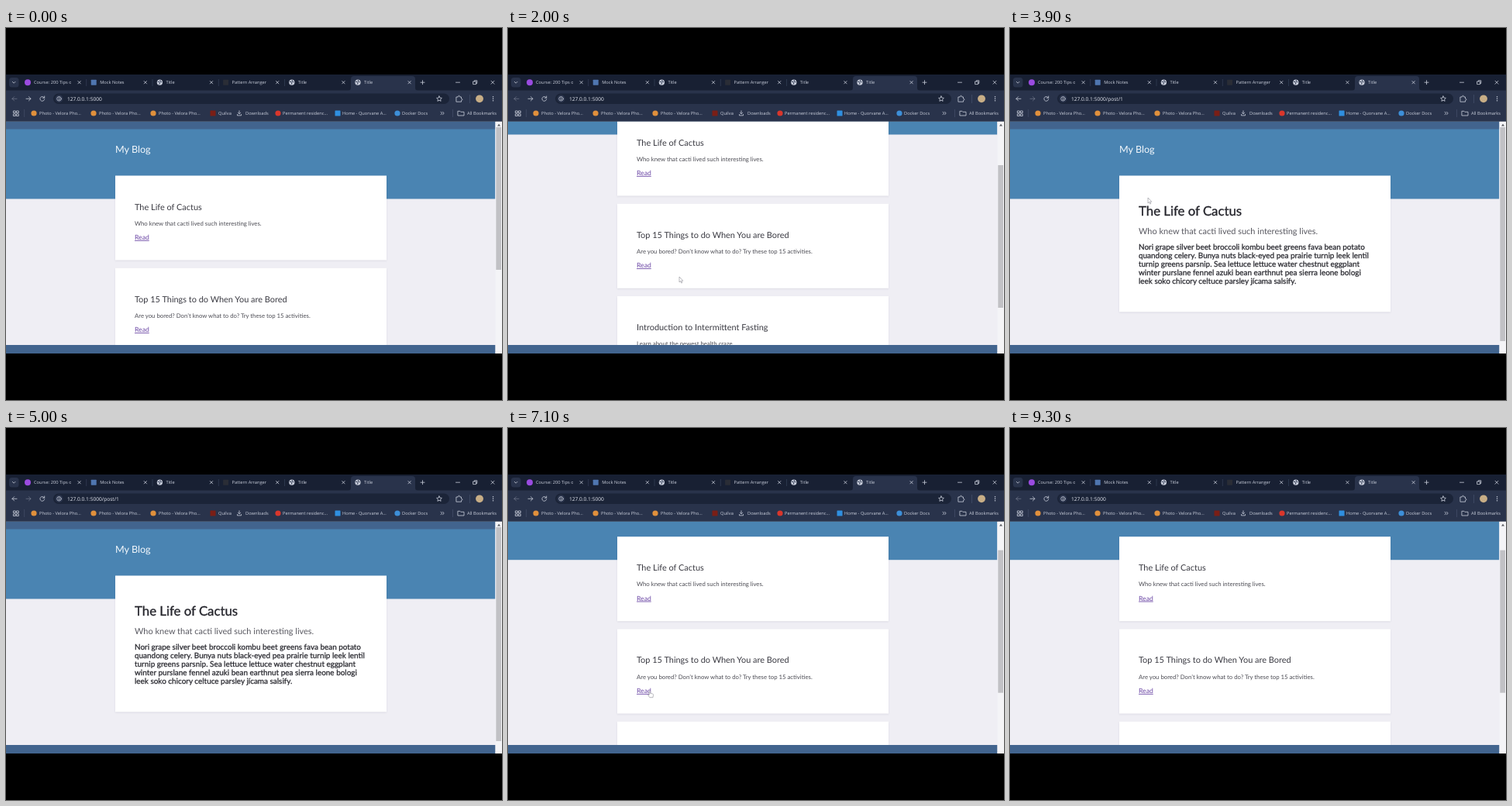
Write an HTML page that moves like this. It is 640 px wide and 480 px high and loops after 9.4 s.

```html
<!DOCTYPE html>
<html lang="en">
<head>
<meta charset="utf-8">
<title>Blog demo</title>
<style>
html, body { margin: 0; width: 100%; height: 100%; overflow: hidden; background: #000; }
svg { display: block; width: 640px; height: 480px; }
text { white-space: pre; text-rendering: geometricPrecision; }
.ui { font: 5.7px "Open Sans", "Noto Sans", sans-serif; fill: #c9cedb; }
.url { font-size: 6.6px; fill: #e6e9f2; }
.page { font-family: Lato, "Open Sans", sans-serif; fill: #3a3a42; }
.brand { font-size: 12.6px; fill: #f4f8fc; }
.head { font-size: 10.95px; }
.sub { font-size: 7.77px; fill: #4c4c54; }
.link { font-size: 8.6px; fill: #6a45a4; text-decoration: underline; }
.big { font-size: 16.8px; fill: #24242b; stroke: #24242b; stroke-width: .35px; }
.lead { font-size: 10.97px; fill: #585860; }
.body { font-size: 9.95px; fill: #24242b; stroke: #24242b; stroke-width: .25px; }
.line { fill: none; stroke: #c9cedb; stroke-width: .8; stroke-linecap: round; stroke-linejoin: round; }
.card { filter: drop-shadow(0 1px 1px rgba(60, 60, 90, .1)); }
</style>
</head>
<body>
<svg id="stage" viewBox="0 0 640 480"></svg>
<script>
const LOOP = 9400;
const stage = document.getElementById('stage');

const rect = (x, y, w, h, fill, more = '') =>
  `<rect x="${x}" y="${y}" width="${w}" height="${h}" fill="${fill}" ${more}/>`;
const dot = (x, y, r, fill, more = '') => `<circle cx="${x}" cy="${y}" r="${r}" fill="${fill}" ${more}/>`;
const text = (x, y, cls, s, more = '') => `<text x="${x}" y="${y}" class="${cls}" ${more}>${s}</text>`;
const line = (d, more = '') => `<path class="line" d="${d}" ${more}/>`;
const square = (x, y, fill) => rect(x - 3.5, y - 3.5, 7, 7, fill, 'rx=".6"');
const cross = (x, y, r) => line(`M${x - r} ${y - r}l${2 * r} ${2 * r}m0 ${-2 * r}l${-2 * r} ${2 * r}`);
const globe = (x, y) => dot(x, y, 3.6, '#c9cedb') +
  `<path d="M${x - 2.8} ${y - 1}l2 .3 1 1.4-1 1.7M${x + .6} ${y - 3}l-.3 1.5 2.3 1.2" fill="none" stroke="#253049" stroke-width="1"/>`;

// Page content
const posts = [
  { title: 'The Life of Cactus', sub: 'Who knew that cacti lived such interesting lives.', body: [
    'Nori grape silver beet broccoli kombu beet greens fava bean potato',
    'quandong celery. Bunya nuts black-eyed pea prairie turnip leek lentil',
    'turnip greens parsnip. Sea lettuce lettuce water chestnut eggplant',
    'winter purslane fennel azuki bean earthnut pea sierra leone bologi',
    'leek soko chicory celtuce parsley jícama salsify.'] },
  { title: 'Top 15 Things to do When You are Bored',
    sub: 'Are you bored? Don’t know what to do? Try these top 15 activities.', body: [
    'Chase ball of string eat plants, meow, and throw up because I ate',
    'plants going to catch the red dot today going to catch the red dot',
    'today. I could pee on this if I had the energy. Chew spare power cord',
    'steal the warm chair right when you get up for purr for no reason',
    'leave hair everywhere, decide to want nothing to do with my owner',
    'today.'] },
  { title: 'Introduction to Intermittent Fasting', sub: 'Learn about the newest health craze.' }
];

const banner = rect(0, 120.5, 631.5, 100, '#4a84b2') + rect(0, 120.5, 631.5, 10, '#42648e') +
  text(141, 161, 'brand', 'My Blog');
const card = (y, h) => rect(141, y, 350, h, '#fff', 'class="card"');

const listView = banner + posts.map((p, i) => {
  const y = 190.5 + i * 119.3;
  return card(y, 109) + text(166, y + 44, 'head', p.title) +
    text(166, y + 64.3, 'sub', p.sub) + text(166, y + 82.4, 'link', 'Read');
}).join('');

const postView = p => banner + card(190.5, 120.5 + 11.05 * p.body.length) +
  text(166, 241.7, 'big', p.title) + text(166, 265.8, 'lead', p.sub) +
  p.body.map((s, i) => text(166, 286.2 + 11.05 * i, 'body', s)).join('');

// Browser frame
const tabs = [
  ['Course: 200 Tips o', (x, y) => dot(x, y, 4, '#9a4be0')],
  ['Mock Notes', (x, y) => square(x, y, '#4f76b0')],
  ['Title', globe],
  ['Pattern Arranger', (x, y) => square(x, y, '#2a2d36')],
  ['Title', globe],
  ['Title', globe]
];
const bookmarks = [
  [36, 43, 'Photo - Velora Pho...', '#e0903c'],
  [113, 120, 'Photo - Velora Pho...', '#e0903c'],
  [190, 197, 'Photo - Velora Pho...', '#e0903c'],
  [267, 274, 'Quilva', '#7a1f16', 1],
  [301, 309, 'Downloads'],
  [351, 357, 'Permanent residenc...', '#d9362b'],
  [428, 434, 'Home - Quorvane A...', '#2f8fe0', 1],
  [505, 511, 'Docker Docs', '#3d8fd8']
];

const tabStrip = rect(0, 60, 640, 21, '#182033') +
  rect(4, 64, 12.5, 12.5, '#29334b', 'rx="3.5"') + line('M8.4 69.4l1.8 1.8 1.8-1.8') +
  '<path d="M441 81q4 0 4-4v-11q0-4 4-4h75q4 0 4 4v11q0 4 4 4z" fill="#29334b"/>' +
  tabs.map(([name, icon], i) => {
    const x = 28 + i * 85.2;
    return icon(x, 70.2) + text(x + 8, 72.4, 'ui', name, 'clip-path="url(#tab' + i + ')"') +
      cross(x + 66.6, 70.2, 1.7) +
      (i < 4 ? rect(x + 75.5, 66, .6, 9, '#3a455f') : '');
  }).join('') +
  line('M535 70.2h5M537.5 67.7v5') + line('M580.5 70.2h5') +
  line('M603 69h3.6v3.6h-3.6zM604.3 69v-1.2h3.5v3.6h-1.2') + cross(628, 70.2, 2);

const toolbar = rect(0, 80.5, 640, 40, '#29334b') +
  dot(11, 91.3, 8, '#fff', 'id="hover" fill-opacity=".1"') +
  line('M14 91.3h-6m2.6-2.6l-2.6 2.6 2.6 2.6', 'id="back"') +
  line('M26 91.3h6m-2.6-2.6l2.6 2.6-2.6 2.6', 'id="next"') +
  line('M49.4 90a2.9 2.9 0 1 0 .3 2M49.7 88v2.2h-2.2') +
  rect(61, 84.5, 511, 13.5, '#1b2438', 'rx="6.7"') +
  dot(68.5, 91.3, 5, '#29334b') + dot(68.5, 91.3, 2.7, 'none', 'class="line"') + line('M68.5 91v1.6M68.5 89.7v.1') +
  text(79, 93.7, 'ui url', '', 'id="url"') +
  line('M559 87.9l1 2.2 2.4.3-1.8 1.6.5 2.4-2.1-1.2-2.1 1.2.5-2.4-1.8-1.6 2.4-.3z') +
  line('M581.3 89h2q.2-1.7 1.2-1.7t1.2 1.7h1.8v2.2q1.4.1 1.4 1.1t-1.4 1.1v1.8h-6.2z') +
  rect(598, 86, .6, 11, '#4a5570') + dot(611, 91.3, 4.9, '#c8ae86') +
  [88.8, 91.3, 93.8].map(y => dot(628.5, y, .75, '#c9cedb')).join('');

const bookmarkBar =
  [0, 4].map(a => [0, 4].map(b => rect(9.8 + a, 107 + b, 2.5, 2.5, 'none', 'class="line"')).join('')).join('') +
  rect(23.5, 105, .6, 10, '#4a5570') +
  bookmarks.map(([x, tx, name, fill, boxy]) =>
    (!fill ? line(`M${x} 106.8v4m-1.6-1.6l1.6 1.6 1.6-1.6M${x - 2.5} 111.5v1.4h5v-1.4`)
      : boxy ? square(x, 110, fill) : dot(x, 110, 3.6, fill)) + text(tx, 112.1, 'ui', name)).join('') +
  line('M561 108.2l1.7 1.8-1.7 1.8m2.5-3.6l1.7 1.8-1.7 1.8') + rect(576, 105, .6, 10, '#4a5570') +
  line('M583.3 107.3h2.6l.9 1h4.2v4.7h-7.7z') + text(595, 112.1, 'ui', 'All Bookmarks');

stage.innerHTML = '<defs><clipPath id="view">' + rect(0, 120.5, 631.5, 299.5, '#000') + '</clipPath>' +
  tabs.map((_, i) => `<clipPath id="tab${i}">${rect(35 + i * 85.2, 62, 49, 18, '#000')}</clipPath>`).join('') + '</defs>' +
  rect(0, 120.5, 640, 299.5, '#efeef4') +
  '<g clip-path="url(#view)" class="page">' +
  [listView, postView(posts[0]), postView(posts[1])].map(v => `<g class="view">${v}</g>`).join('') + '</g>' +
  rect(0, 409, 631.5, 11, '#42648e') +
  rect(631.5, 120.5, 8.5, 299.5, '#f4f4f7') + '<path d="M634 126.4l2-2.6 2 2.6z" fill="#55565c"/>' +
  rect(632.3, 128, 6.7, 184, '#c1c1c5', 'id="thumb"') +
  tabStrip + toolbar + bookmarkBar +
  '<g id="pointer" stroke="#8a8a92" stroke-width=".6" stroke-linejoin="round" fill="#fff">' +
  '<path id="arrow" d="M0 0v7l1.6-1.4 1.1 2.5 1.1-.5-1.1-2.4h2.1z"/>' +
  '<path id="hand" d="M-.8 .6q.8-1 1.5 0v2.8l2.9.6q1 .3.9 1.3l-.5 3.4h-4.2l-2.3-3.2q.2-1 1.7 0z"/></g>';

const $ = id => document.getElementById(id);
const views = [...document.querySelectorAll('.view')];

// Time tables: [ms, values...]
const pages = [[0, 0], [3800, 1], [6400, 0], [7500, 2], [8700, 0]];
const scrolls = [[0, 0], [350, 0], [800, 100], [1700, 100], [2000, 83], [2400, 83],
  [2800, 49.5], [3800, 49.5], [6400, 50.3]];
const moves = [[300, 205, 330], [800, 212, 319], [1300, 212, 319], [1900, 221, 321], [2500, 221, 321],
  [3200, 180, 236], [3350, 180, 236], [3600, 178, 219], [4100, 178, 219], [5300, 120, 190], [5900, 11, 91],
  [6500, 11, 91], [7000, 183, 339], [7600, 183, 339], [8400, 11, 91]];
const shown = [[300, 4100], [5300, 9000]];
const overLink = [[3560, 3800], [6980, 7500]];

const within = (spans, t) => spans.some(([a, b]) => t >= a && t < b);
const show = (el, on) => { el.style.display = on ? '' : 'none'; };

function at(keys, t) {
  const i = keys.findIndex(k => k[0] > t);
  if (i < 0) return keys[keys.length - 1].slice(1);
  if (i === 0) return keys[0].slice(1);
  const a = keys[i - 1], b = keys[i];
  const p = (t - a[0]) / (b[0] - a[0]), e = p * p * (3 - 2 * p);
  return a.slice(1).map((v, n) => v + (b[n + 1] - v) * e);
}

function draw(t) {
  const page = pages.filter(p => p[0] <= t).pop()[1];
  const scroll = page ? 0 : at(scrolls, t)[0];
  const [x, y] = at(moves, t);
  const visible = within(shown, t), hand = within(overLink, t);

  views.forEach((v, i) => show(v, i === page));
  views[0].setAttribute('transform', `translate(0 ${-scroll})`);
  $('thumb').setAttribute('y', 128 + scroll * .59);
  $('thumb').setAttribute('height', page ? 276 : 184);
  $('url').textContent = '127.0.0.1:5000' + (page ? '/post/' + page : '');
  $('back').style.opacity = page ? 1 : .4;
  $('next').style.opacity = page ? .4 : 1;

  show($('pointer'), visible);
  show($('arrow'), !hand);
  show($('hand'), hand);
  show($('hover'), visible && Math.hypot(x - 11, y - 91) < 9);
  $('pointer').setAttribute('transform', `translate(${x} ${y})`);
}

const start = performance.now();
function tick() {
  draw((performance.now() - start) % LOOP);
  requestAnimationFrame(tick);
}
tick();
</script>
</body>
</html>
```
